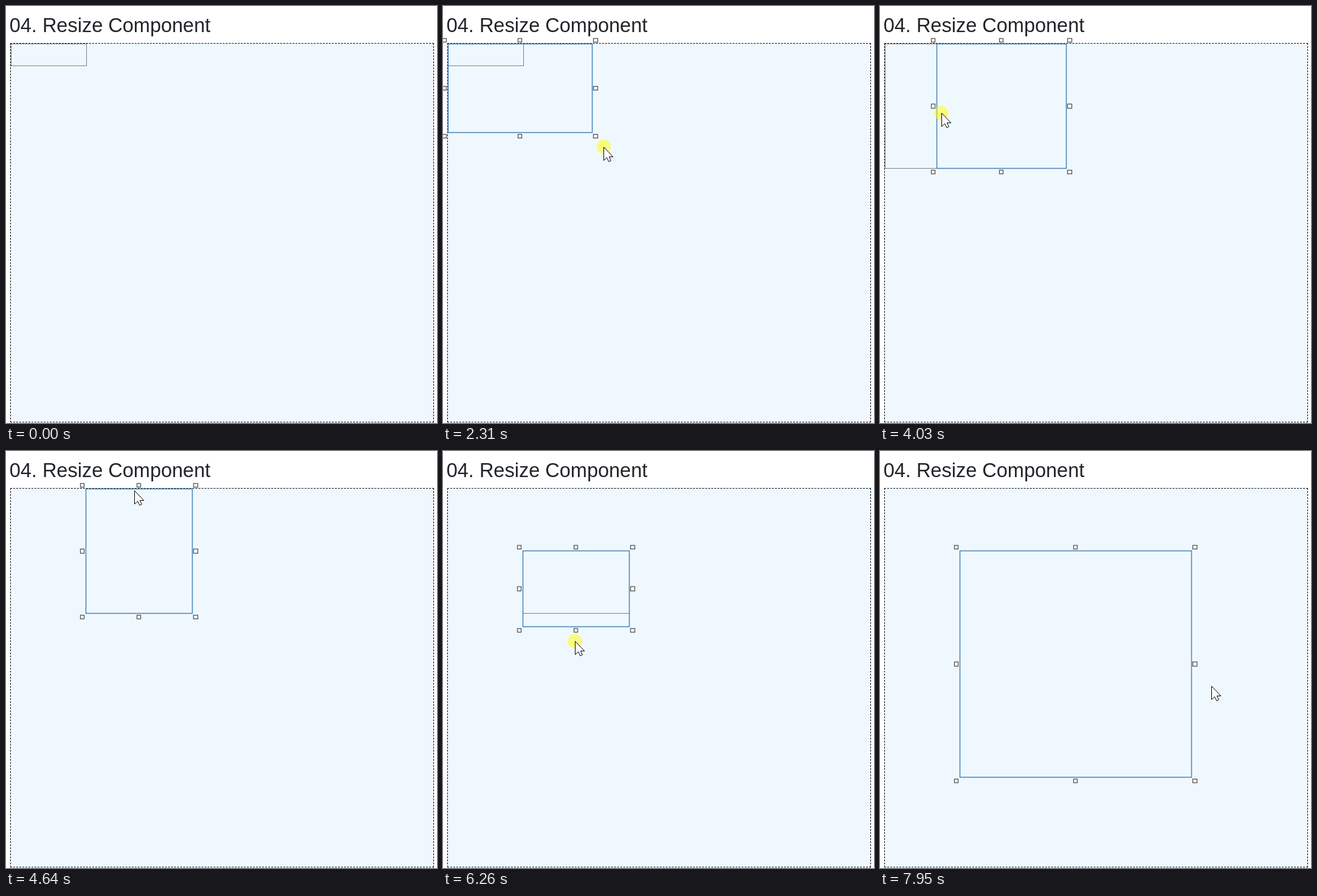
These frames come from a looping animation (709 px wide and 687 px high, 8000 ms). An HTML page with a canvas:

```html
<!DOCTYPE html>
<html lang="en">
<head>
<meta charset="utf-8">
<title>Resize Component</title>
<style>
  html, body { margin: 0; width: 100%; height: 100%; overflow: hidden; background: #fff; }
  h2 {
    position: absolute; left: 5.7px; top: 14px; margin: 0; white-space: nowrap;
    font: 400 32.5px/36px "Liberation Sans", Arial, sans-serif; color: #212529;
  }
  #area {
    position: absolute; left: 7px; top: 61px; width: 697px; height: 625px;
    box-sizing: border-box; border: 1px dashed #000; background: #f0f8ff;
  }
  canvas { position: absolute; left: 0; top: 0; }
</style>
</head>
<body>
<h2>04. Resize Component</h2>
<div id="area"></div>
<canvas id="overlay" width="709" height="687"></canvas>
<script>
const LOOP = 8000, TICK = 76;
const DWELL = 130;   // pause between the end of a pull and the release
const LAG = 0.076;   // how far the outline trails the pointer, as a share of the pull
const SELECTED_AT = 1130;
const ctx = document.getElementById('overlay').getContext('2d');

const gestures = [], legs = [], presses = [], drags = [];
let pointer = { x: 687, y: 670 };

function moveTo(start, end, x, y) {
  legs.push({ start, end, from: pointer, to: { x, y } });
  pointer = { x, y };
}

function glide(start, end, x, y) {
  gestures.push({ start, end });
  moveTo(start, end, x, y);
}

function press(start, end) {
  presses.push({ start, end });
}

// Pull the given edges by dx, dy, let go, then rest at x, y.
function drag(start, pull, edges, dx, dy, end, x, y) {
  const release = start + pull + DWELL;
  gestures.push({ start, end });
  press(start, release);
  drags.push({ start, pull, release, edges, origin: pointer });
  moveTo(start, start + pull, pointer.x + dx, pointer.y + dy);
  moveTo(release, end, x, y);
}

glide(350, 810, 62, 101);
glide(960, 1220, 66, 84);
press(1040, 1215);
glide(1530, 1760, 133, 104);
drag(2070, 350, 'se', 174, 169, 2860, 116, 206);
glide(2940, 3240, 4, 159);
glide(3550, 3550, 4, 167);
press(3800, 3950);
drag(3950, 108, 'w', 123, 12, 4710, 216, 58);
drag(5030, 258, 'n', 0, 102, 5800, 223, 267);
glide(5880, 6030, 216, 270);
drag(6180, 300, 's', 4, 270, 6864, 320, 415);
glide(6940, 7190, 311, 351);
drag(7340, 400, 'e', 206, 1, 7950, 545, 387);

const last = (list, t) => list.filter(item => item.start <= t).pop();
const within = (item, t, end) => t >= item.start && t < end;

// The picture advances in even ticks during a gesture and rests between them.
function stepTime(t) {
  const gesture = last(gestures, t);
  if (!gesture || t >= gesture.end) return t;
  const { start, end } = gesture;
  const step = (end - start) / Math.round((end - start) / TICK);
  return start + Math.floor((t - start) / step) * step;
}

function pointerAt(t) {
  const leg = last(legs, t);
  if (!leg) return pointer;
  const { start, end, from, to } = leg;
  const k = t >= end ? 1 : (t - start) / (end - start);
  const ease = k * k * (3 - 2 * k);
  return { x: from.x + (to.x - from.x) * ease, y: from.y + (to.y - from.y) * ease };
}

function resized(box, { edges, origin }, { x, y }) {
  const next = { ...box };
  for (const edge of edges) {
    next[edge] = Math.round(box[edge] + ('we'.includes(edge) ? x - origin.x : y - origin.y));
  }
  return next;
}

// Committed box, outline being dragged and the active drag
function boxesAt(t) {
  let box = { w: 8, n: 62, e: 132, s: 98 };
  for (const item of drags) {
    if (within(item, t, item.release)) {
      const trailing = Math.max(item.start, t - item.pull * LAG);
      return { box, outline: resized(box, item, pointerAt(trailing)), active: item };
    }
    if (t >= item.release) box = resized(box, item, pointerAt(item.start + item.pull));
  }
  return { box, outline: box };
}

function handlesOf({ w, n, e, s }) {
  const xs = { w: w - 6, '': Math.floor((w + e) / 2), e: e + 5.5 };
  const ys = { n: n - 6, '': (n + s) / 2, s: s + 6 };
  const list = [];
  for (const v in ys) for (const h in xs) {
    if (v + h) list.push({ name: v + h, x: xs[h], y: ys[v] });
  }
  return list;
}

function frame(l, t, r, b, color, width = 1) {
  ctx.lineWidth = width;
  ctx.strokeStyle = color;
  ctx.strokeRect(l + 0.5, t + 0.5, r - l, b - t);
}

function drawHandle({ x, y }) {
  const l = Math.ceil(x - 3.5), t = Math.ceil(y - 3.5);
  const r = Math.floor(x + 3.5), b = Math.floor(y + 3.5);
  // Exact centres cover seven pixels, half ones eight.
  ctx.fillStyle = '#fff';
  ctx.fillRect(l, t, r - l + 1, b - t + 1);
  frame(l, t, r, b, '#5c5c5c', 1.4);
}

const arrow = new Path2D('M.5 .5V22.5L5.5 17.8 8.8 24.5 12.3 22.9 9.3 16.5H15.8Z');
const doubleArrow = new Path2D('M0-11.5L5-6H1.5V6H5L0 11.5-5 6H-1.5V-6H-5Z');

function turnOf(name) {
  if (name.length === 1) return 'we'.includes(name) ? Math.PI / 2 : 0;
  return (name === 'nw' || name === 'se' ? -1 : 1) * Math.PI / 4;
}

function drawPointer({ x, y }, handle) {
  const shape = handle ? doubleArrow : arrow;
  ctx.save();
  ctx.translate(Math.round(x), Math.round(y));
  if (handle) ctx.rotate(turnOf(handle.name));
  ctx.fillStyle = '#fff';
  ctx.strokeStyle = '#000';
  ctx.lineWidth = 1;
  ctx.fill(shape);
  ctx.stroke(shape);
  ctx.restore();
}

function draw(t) {
  ctx.clearRect(0, 0, 709, 687);
  const { box, outline, active } = boxesAt(t);
  const selected = t >= SELECTED_AT;
  const handles = selected ? handlesOf(outline) : [];

  frame(box.w, box.n, box.e, box.s, '#808080');
  if (selected) frame(outline.w, outline.n, outline.e, outline.s, '#4682b4', 1.5);
  handles.forEach(drawHandle);

  if (t < legs[0].start) return;
  const at = pointerAt(t);
  if (presses.some(p => within(p, t, p.end))) {
    ctx.fillStyle = 'rgba(255, 255, 0, .5)';
    ctx.beginPath();
    ctx.arc(at.x, at.y, 11.7, 0, 2 * Math.PI);
    ctx.fill();
  }
  const pulling = active && t > active.start;
  const hovered = !pulling && handles.find(
    h => Math.abs(h.x - at.x) < 5 && Math.abs(h.y - at.y) < 5);
  drawPointer(at, hovered);
}

const began = performance.now();
function tick() {
  draw(stepTime((performance.now() - began) % LOOP));
  requestAnimationFrame(tick);
}
tick();
</script>
</body>
</html>
```
